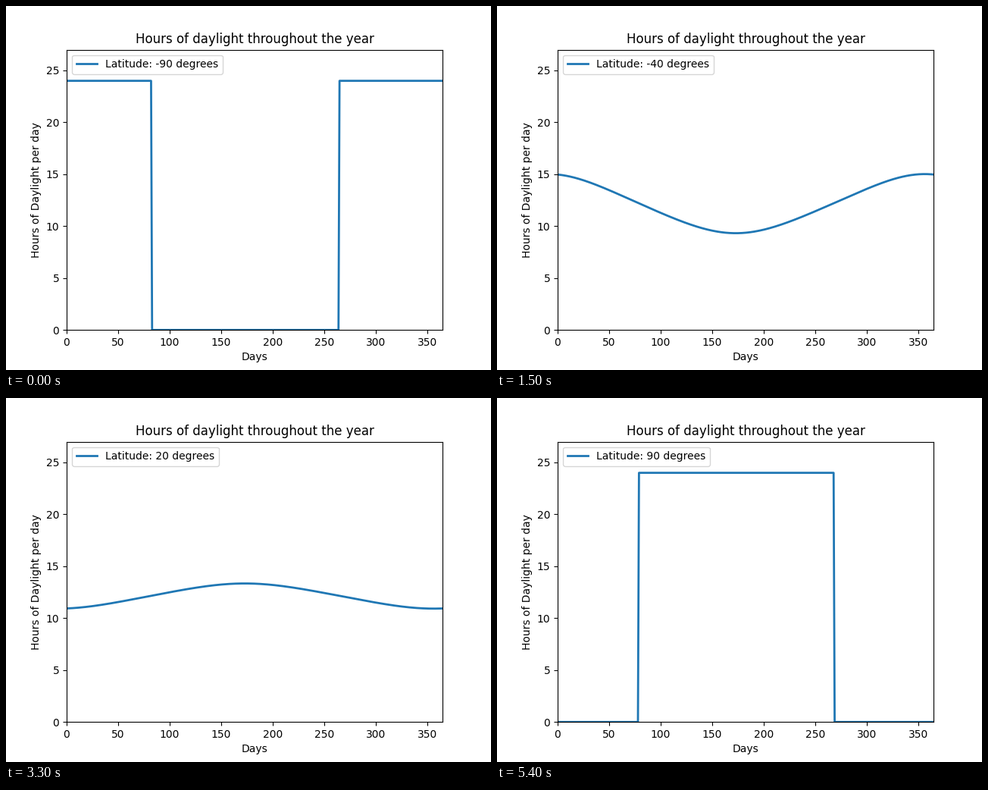
These frames come from a looping animation (640x480 px, 5430 ms). A matplotlib script:

```python
import numpy as np
import matplotlib.pyplot as plt
from matplotlib.animation import FuncAnimation

LATITUDES = range(-90, 91)
DAYS = np.arange(366)
HORIZON = np.radians(0.8333)  # sun's upper limb touching the horizon


def daylight(day, latitude):
    """Hours of daylight by the CBM model, with polar day and night."""
    lat = np.radians(latitude)
    orbit = 0.2163108 + 2 * np.arctan(0.9671396 * np.tan(0.00860 * (day - 186)))
    decl = np.arcsin(0.39795 * np.cos(orbit))
    ratio = (np.sin(HORIZON) + np.sin(lat) * np.sin(decl)) / (np.cos(lat) * np.cos(decl))
    return 24 - 24 / np.pi * np.arccos(np.clip(ratio, -1, 1))


fig, ax = plt.subplots(figsize=(6.4, 4.8), dpi=100)
line, = ax.plot([], [], lw=2, label="Latitude: -90 degrees")
ax.set_xlim(0, 365)
ax.set_ylim(0, 27)
ax.set_title("Hours of daylight throughout the year")
ax.set_xlabel("Days")
ax.set_ylabel("Hours of Daylight per day")
label = ax.legend(loc="upper left").get_texts()[0]


def update(i):
    latitude = LATITUDES[i]
    line.set_data(DAYS, daylight(DAYS, latitude))
    label.set_text(f"Latitude: {latitude} degrees")
    return line, label


anim = FuncAnimation(fig, update, frames=len(LATITUDES), interval=30,
                     repeat=True, repeat_delay=0, blit=False)
plt.show()
```
